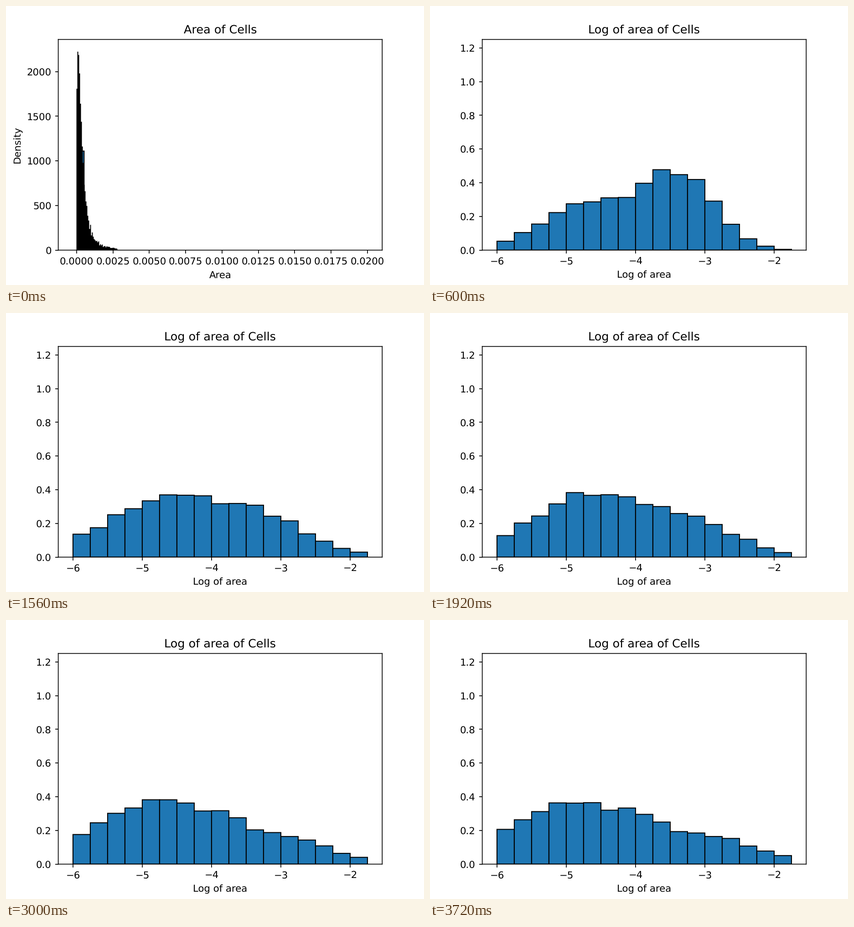
Write a matplotlib script that moves like this. It is 917x611 px and loops after 3.84 s.

```python
import numpy as np
import matplotlib.pyplot as plt
from matplotlib.animation import FuncAnimation

plt.rcParams.update({
    "font.family": "DejaVu Sans",
    "text.hinting": "none",
    "path.snap": False,
    "axes.titlepad": 6.5,
    "axes.labelpad": 4.5,
})
BLUE = "#1f77b4"
DPI = 152.75
FRAMES, INTERVAL = 32, 120
BIN = 0.25
BIN_LEFT = np.arange(-6, -1.75, BIN)
rng = np.random.default_rng(4)


def bump(x, center, width):
    return np.exp(-((x - center) / width) ** 2 / 2)


def log_density(step):
    """A narrow peak of large cells melts into a broad peak of small ones."""
    x = BIN_LEFT + BIN / 2
    broad = 0.38 * (1 - np.exp(-step / 3)) * bump(x, -4.57 - 0.006 * step, 0.62 + 0.0145 * step)
    narrow = 3 / (step + 1.8) * bump(x, -3.45 + 0.021 * step, 0.72 - 0.35 * np.exp(-step / 10))
    density = broad + narrow
    density += 0.025 * np.sqrt(density) * rng.normal(size=x.size)
    density = np.maximum(density, 0)
    return density / (density.sum() * BIN)


def add_axes(title, xlabel):
    ax = fig.add_axes([0.125, 0.125, 0.775, 0.755])
    ax.set(title=title, xlabel=xlabel)
    return ax


def draw_area_histogram(ax):
    """Steep area distribution, with x in units of 1e-4 until drawn."""
    edges = np.linspace(-0.15, 28, 46)
    x = np.maximum(edges[:-1], 0)
    heights = 2260 / (1 + (x / 3.76) ** 2.4) * (1 - 0.2 * np.exp(-x / 0.15))
    noise = 0.05 * np.minimum(x / 5, 3) * rng.normal(size=x.size)
    ax.bar(0.00037, 1110, 0.00014, align="edge", color=BLUE, edgecolor="black")
    ax.stairs(heights * (1 + noise), edges * 1e-4, fill=True, color="black", lw=0)


fig = plt.figure(figsize=(917.004 / DPI, 611.004 / DPI), dpi=DPI, facecolor="white")

area_ax = add_axes("Area of Cells", "Area")
draw_area_histogram(area_ax)
area_ax.set(ylabel="Density", xlim=(-0.001266, 0.021014), ylim=(0, 2360),
            xticks=np.arange(9) * 0.0025, yticks=range(0, 2001, 500))
area_ax.xaxis.set_major_formatter("{x:.4f}")

log_ax = add_axes("Log of area of Cells", "Log of area")
densities = [log_density(step) for step in range(FRAMES)]
bars = log_ax.bar(BIN_LEFT, densities[0], BIN, align="edge",
                  color=BLUE, edgecolor="black", linewidth=1)
log_ax.set(xlim=(-6.2125, -1.5375), ylim=(0, 1.25),
           xticks=range(-6, -1), yticks=np.arange(7) * 0.2)


def update(frame):
    area_ax.set_visible(frame == 0)
    log_ax.set_visible(frame > 0)
    for bar, height in zip(bars, densities[frame]):
        bar.set_height(height)
    return [area_ax, log_ax]


animation = FuncAnimation(fig, update, frames=FRAMES, interval=INTERVAL,
                          repeat=True, repeat_delay=0, blit=False)
plt.show()
```
